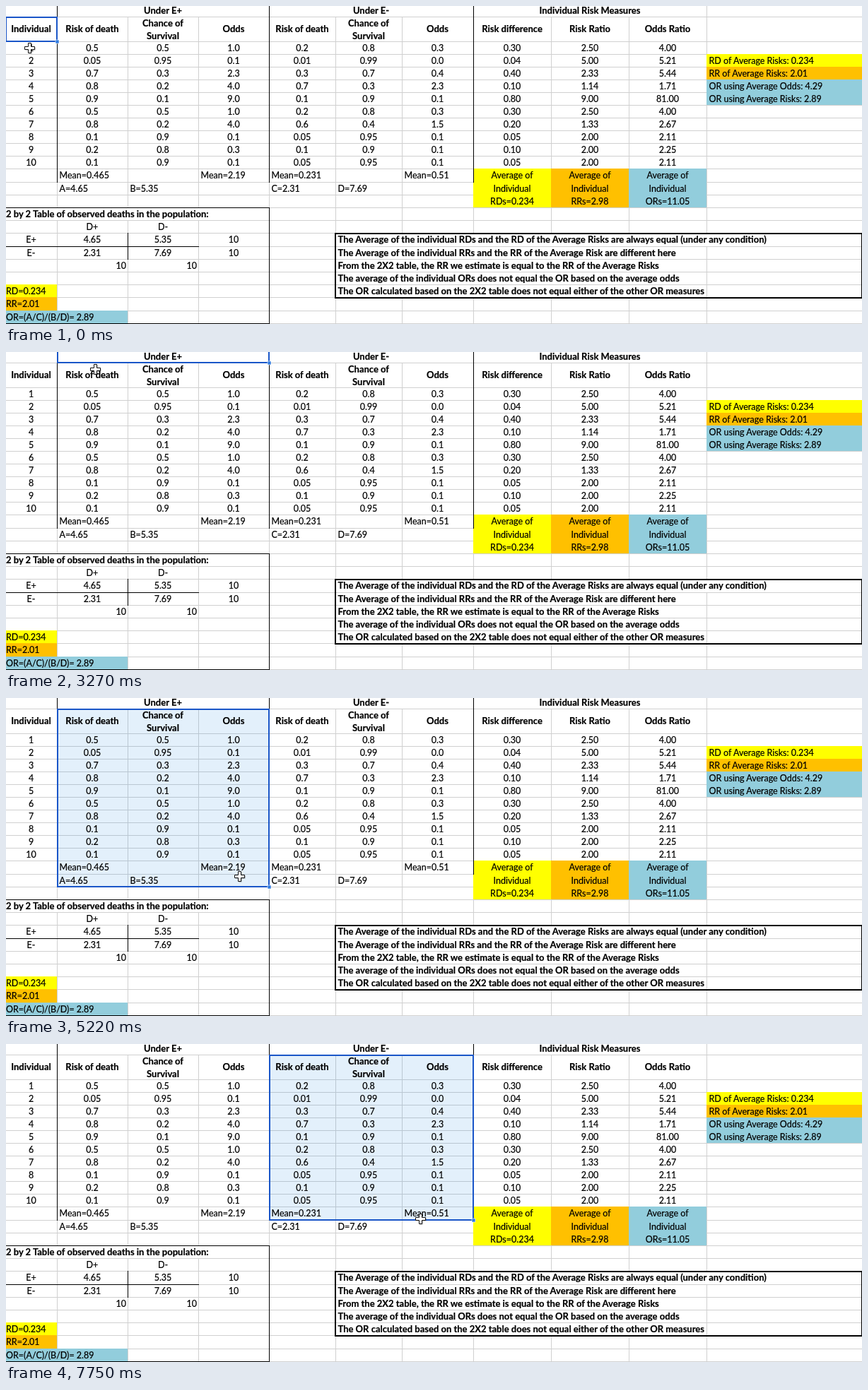
An HTML page that plays this animation: 1211 by 450 pixels, repeating every 8 s.

```html
<!DOCTYPE html>
<html lang="en">
<head>
<meta charset="utf-8">
<title>Risk measures sheet</title>
<style>
html, body { margin: 0; width: 100%; height: 100%; overflow: hidden; background: #fff; }
svg { display: block; width: 1211px; height: 450px; }
text { font: 12.5px Lato, sans-serif; white-space: pre; stroke: #000; stroke-width: .2px; }
.b { font-weight: 700; font-size: 13px; }
.m { text-anchor: middle; }
.e { text-anchor: end; }
</style>
</head>
<body>
<svg viewBox="0 0 1211 450">
  <g id="grid" shape-rendering="crispEdges"></g>
  <rect id="tint" fill="#2a8be0" fill-opacity=".13"/>
  <g id="lines" shape-rendering="crispEdges"></g>
  <g id="words"></g>
  <rect id="frame" fill="none" stroke="#1a56c8" stroke-width="2"/>
  <rect id="knob" width="5" height="5" fill="#2f7be0" stroke="#fff" stroke-width=".6"/>
  <g id="cursor">
    <path d="M-1.5-6.5h4v5h5v4h-5v5h-4v-5h-5v-4h5z" opacity=".35"/>
    <path d="M-2.5-7.5h4v5h5v4h-5v5h-4v-5h-5v-4h5z" fill="#fff" stroke="#111"/>
  </g>
</svg>
<script>
const $ = id => document.getElementById(id);
const X = [-1, 72, 172, 272, 372, 466, 560, 661, 771, 881, 991, 1211];
// Rows are 18 px high; lower down every fifth one is a pixel taller.
const rowEdge = k => 50 + 18 * k + Math.floor(Math.max(0, (k - 6) / 5));
const Y = [-4, 15, ...Array.from({ length: 23 }, (_, k) => rowEdge(k))];
const FILLS = ['#ff0', '#ffc000', '#92cddc'];
const layers = { grid: '', lines: '', words: '' };

// Cells and ranges are addressed by column and row edge indices.
const rect = (layer, x, y, w, h, fill) =>
  layers[layer] += `<rect x="${x}" y="${y}" width="${w}" height="${h}" fill="${fill}"/>`;
const text = (x, y, s, cls = '') =>
  layers.words += `<text x="${x}" y="${y + 4.5}" class="${cls}">${s}</text>`;
const fill = (c0, r0, c1, r1, color) =>
  rect('grid', X[c0], Y[r0], X[c1] - X[c0], Y[r1] - Y[r0], color);
const merge = (c0, r0, c1, r1) =>
  rect('grid', X[c0] + 1, Y[r0] + 1, X[c1] - X[c0] - 1, Y[r1] - Y[r0] - 1, '#fff');
const vline = (c, r0, r1) => rect('lines', X[c], Y[r0], 1, Y[r1] - Y[r0] + 1, '#000');
const hline = (r, c0, c1) => rect('lines', X[c0], Y[r], X[c1] - X[c0] + 1, 1, '#000');
const midX = (c, end = c + 1) => (X[c] + X[end]) / 2;
const midY = r => (Y[r] + Y[r + 1]) / 2;
const cell = (c, r, s, cls = 'm') => text(midX(c), midY(r), s, cls);
const left = (c, r, s, cls) => text(c ? X[c] + 3.5 : 0, midY(r), s, cls);

// Risk of death of each person, exposed and unexposed
const P = [.5, .05, .7, .8, .9, .5, .8, .1, .2, .1];
const Q = [.2, .01, .3, .7, .1, .2, .6, .05, .1, .05];
const odds = p => p / (1 - p);
const sum = list => list.reduce((a, b) => a + b);
const mean = list => sum(list) / list.length;
const measures = P.map((p, i) => [p - Q[i], p / Q[i], odds(p) / odds(Q[i])]);
const [A, C] = [sum(P), sum(Q)];
const [B, D] = [10 - A, 10 - C];
const fix = v => v.toFixed(2);
const RD = (mean(P) - mean(Q)).toFixed(3), RR = fix(A / C), OR = fix((A / C) / (B / D));
const oddsRatio = fix(mean(P.map(odds)) / mean(Q.map(odds)));

// Grid, merged cells and fills
X.forEach(x => rect('grid', x, 0, 1, 450, '#d0d0d0'));
Y.forEach(y => rect('grid', 0, y, 1211, 1, '#d0d0d0'));
for (const c of [1, 4, 7]) merge(c, 0, c + 3, 1);
merge(0, 15, 4, 16);
for (let r = 17; r < 22; r++) merge(5, r, r > 17 ? 10 : 11, r + 1);
FILLS.forEach((color, i) => {
  fill(10, 3 + i, 11, i < 2 ? 4 + i : 7, color);
  fill(7 + i, 12, 8 + i, 15, color);
  fill(0, 21 + i, i < 2 ? 1 : 2, 22 + i, color);
});

// Borders
for (const c of [1, 4, 7]) vline(c, 0, 13);
hline(15, 0, 4);
hline(24, 0, 4);
vline(4, 15, 24);
vline(2, 17, 19);
hline(18, 0, 3);
layers.lines += `<rect x="466" y="322" width="745" height="91" fill="none" stroke="#000" stroke-width="2"/>`;

// Main table
['Under E+', 'Under E-', 'Individual Risk Measures'].forEach((s, i) =>
  text(midX(1 + 3 * i, 4 + 3 * i), 6, s, 'b m'));
cell(0, 1, 'Individual', 'b m');
['Risk difference', 'Risk Ratio', 'Odds Ratio'].forEach((s, i) => cell(7 + i, 1, s, 'b m'));
[P, Q].forEach((risks, i) => {
  const c = 1 + 3 * i;
  cell(c, 1, 'Risk of death', 'b m');
  text(midX(c + 1), 24, 'Chance of', 'b m');
  text(midX(c + 1), 42, 'Survival', 'b m');
  cell(c + 2, 1, 'Odds', 'b m');
  risks.forEach((p, r) =>
    [p, +fix(1 - p), odds(p).toFixed(1)].forEach((s, j) => cell(c + j, r + 2, s)));
  left(c, 12, 'Mean=' + mean(risks).toFixed(3));
  left(c + 2, 12, 'Mean=' + fix(mean(risks.map(odds))));
  left(c, 13, 'AC'[i] + '=' + fix(sum(risks)));
  left(c + 1, 13, 'BD'[i] + '=' + fix(10 - sum(risks)));
});
measures.forEach((row, r) => {
  cell(0, r + 2, r + 1);
  row.forEach((v, j) => cell(7 + j, r + 2, fix(v)));
});
['RDs', 'RRs', 'ORs'].forEach((name, j) => {
  const average = mean(measures.map(row => row[j])).toFixed(j ? 2 : 3);
  ['Average of', 'Individual', `${name}=${average}`].forEach((s, r) => cell(7 + j, 12 + r, s));
});
[`RD of Average Risks: ${RD}`, `RR of Average Risks: ${RR}`,
 `OR using Average Odds: ${oddsRatio}`, `OR using Average Risks: ${OR}`
].forEach((s, i) => left(10, 3 + i, s));

// Two by two table
left(0, 15, '2 by 2 Table of observed deaths in the population:', 'b');
[['', 'D+', 'D-', ''], ['E+', fix(A), fix(B), 10], ['E-', fix(C), fix(D), 10]]
  .forEach((row, r) => row.forEach((s, c) => cell(c, 16 + r, s)));
for (const c of [2, 3]) text(X[c] - 2, midY(19), 10, 'e');
[`RD=${RD}`, `RR=${RR}`, `OR=(A/C)/(B/D)= ${OR}`].forEach((s, i) => left(0, 21 + i, s));

['The Average of the individual RDs and the RD of the Average Risks are always equal (under any condition)',
 'The Average of the individual RRs and the RR of the Average Risk are different here',
 'From the 2X2 table, the RR we estimate is equal to the RR of the Average Risks',
 'The average of the individual ORs does not equal the OR based on the average odds',
 'The OR calculated based on the 2X2 table does not equal either of the other OR measures'
].forEach((s, i) => left(5, 17 + i, s, 'b'));
for (const id in layers) $(id).innerHTML = layers[id];

// Pointer moves: first step, last step, destination
const HOME = [34, 32];
const MOVES = [
  [-1, 0, 34, 60], [1, 7, 44, 228], [9, 17, 204, 10], [19, 22, 127, 25], [26, 30, 254, 31],
  [31, 35, 331, 253], [35, 41, 542, 7], [43, 46, 420, 32], [47, 51, 587, 248]
];
// Selections: first step, last dragged step, anchor column, anchor row, least right edge
const PICKS = [[0, -1, 0, 1, 1], [1, 8, 0, 2, 1], [18, 18, 1, 0, 4],
               [24, 35, 1, 1, 2], [43, 43, 4, 0, 7], [47, 53, 4, 1, 5]];

function pointer(k) {
  let [x, y] = HOME;
  for (const [from, to, tx, ty] of MOVES) {
    const u = Math.min(1, Math.max(0, (k - from) / (to - from)));
    x += (tx - x) * u;
    y += (ty - y) * u;
  }
  return [Math.round(x), Math.round(y)];
}

const set = (id, attrs) => {
  for (const name in attrs) $(id).setAttribute(name, attrs[name]);
};

function draw(now) {
  const k = Math.floor((now % 8000 + 10) / 149.05);
  const [, last, c0, r0, cMin] = PICKS.findLast(p => p[0] <= k);
  const [px, py] = pointer(Math.min(k, last));
  const c1 = Math.max(cMin, X.findIndex(x => x >= px));
  const r1 = Math.max(r0 + 1, Y.findIndex(y => y >= py));
  const [x, y, width, height] = [X[c0], Y[r0], X[c1] - X[c0], Y[r1] - Y[r0]];
  const single = c1 === cMin && r1 === r0 + 1;
  set('tint', { x, y, width, height, visibility: single ? 'hidden' : 'visible' });
  set('frame', { x: x + 1, y: y + 1, width: width - 1, height: height - 1 });
  set('knob', { x: x + width - 2, y: y + height - 2 });
  set('cursor', { transform: `translate(${pointer(k)})` });
}

const start = performance.now();
(function loop() {
  draw(performance.now() - start);
  requestAnimationFrame(loop);
})();
</script>
</body>
</html>
```
